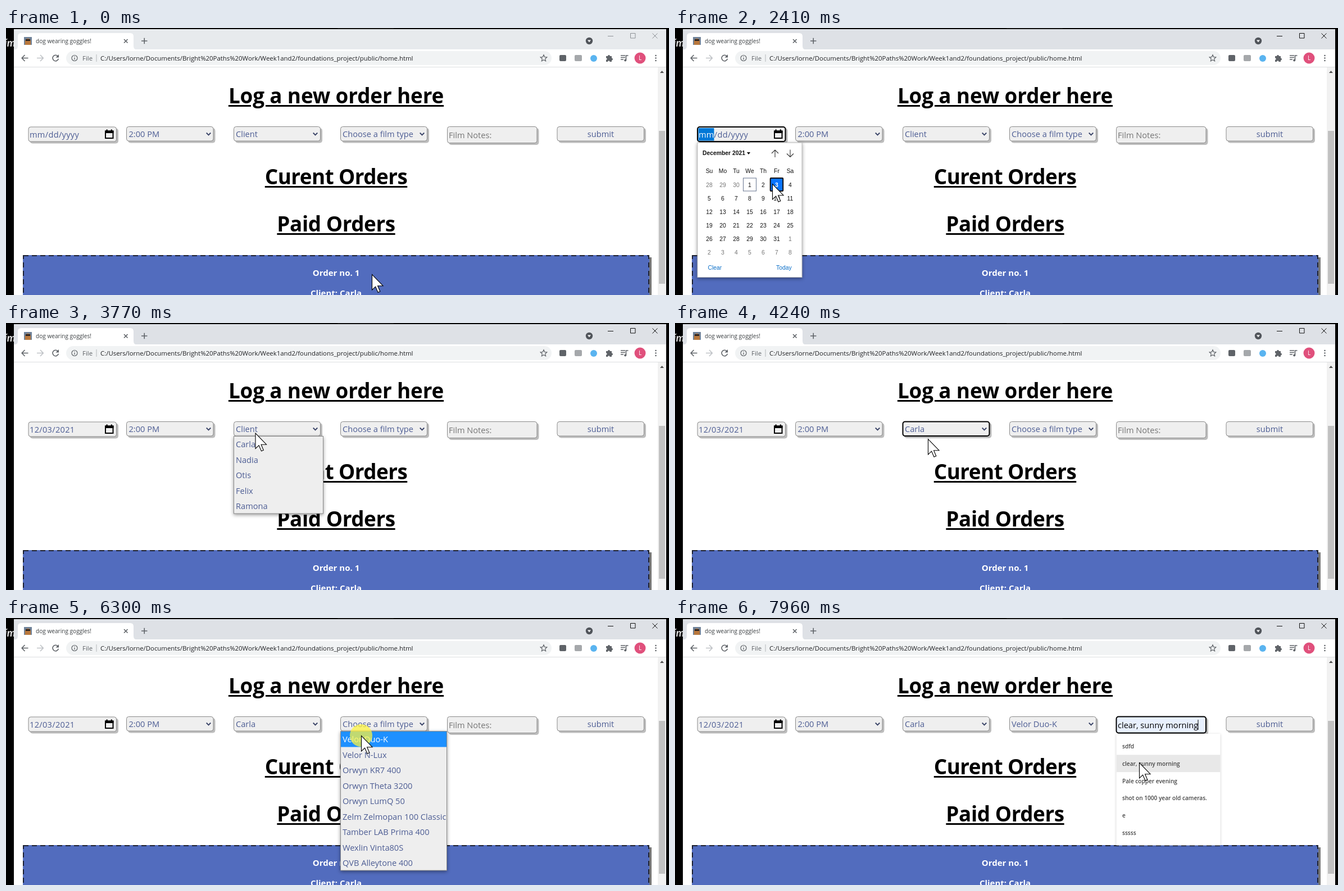
Recreate the animation shown at these times as an HTML page. Size 1180 by 475 pixels, loop 8 s.

```html
<!DOCTYPE html>
<html lang="en">
<head>
<meta charset="utf-8">
<title>Order form</title>
<style>
html, body { margin: 0; width: 1180px; height: 475px; overflow: hidden; background: #000; }
svg { position: absolute; inset: 0; display: block; }
text { font: 14.6px "Open Sans", "Noto Sans", sans-serif; fill: #4d5d94; white-space: pre; }
.mid { text-anchor: middle; }
h1 {
  position: absolute; left: 14px; width: 1147px; margin: 0; text-align: center;
  font: 700 36.8px/50px "Open Sans", "Noto Sans", sans-serif; color: #000;
  text-decoration: underline 3px; text-underline-offset: 3px;
}
.ui { font-size: 11.4px; fill: #202124; }
.line { fill: none; stroke: #5f6368; stroke-width: 1.6; }
.win { fill: none; stroke: #8d9196; stroke-width: 1; }
.active .win { stroke: #111; }
.strip { fill: #e7eaed; }
.active .strip { fill: #dee1e6; }
.field { fill: #efefef; stroke: #8a8a8a; stroke-width: 1; filter: drop-shadow(3px 3px .6px #bdbdbd); }
.field.focus { stroke: #000; stroke-width: 2; }
.field.filled { fill: #e8f0fe; }
.chev { fill: none; stroke: #3a4468; stroke-width: 1.9; }
.order { font-weight: 700; font-size: 15px; fill: #fff; }
.pop { filter: drop-shadow(0 2px 3px #0006); }
.soft { filter: drop-shadow(0 1px 2px #0003); }
.cal text { font: 10.36px "Liberation Sans", Arial, sans-serif; fill: #111; }
.cal .out { fill: #757575; }
.cal .link { fill: #0b6fc8; }
.cal .bold { font-weight: 700; }
.cal .picked { fill: #fff; font-weight: 700; }
.hint { font-weight: 600; font-size: 10.1px; fill: #444; }
</style>
</head>
<body>
<svg id="stage" width="1180" height="475" viewBox="0 0 1180 475">
  <text x="-3" y="33" style="font:italic 700 19px Lato,sans-serif;fill:#ddd">ím</text>
  <path d="M590 .5H690" stroke="#222"/>

  <rect class="strip" x="14" y="2" width="1161" height="37"/>
  <path d="M15 38.5Q21 38.5 21 32V15Q21 9 27 9H221Q227 9 227 15V32Q227 38.5 233 38.5Z" fill="#fff"/>
  <rect x="14" y="38" width="1161" height="437" fill="#fff"/>
  <rect x="32" y="16" width="14" height="14" fill="#6f8299"/>
  <path d="M34 30V22Q39 15 44 22V30Z" fill="#b9783c"/>
  <path d="M35 20H43V23H35Z" fill="#2b2422"/>
  <text class="ui" x="53" y="27" style="font-size:10.1px;fill:#3c4043">dog wearing goggles!</text>
  <path class="line" d="M210 20l6.5 6.5M216.500 20l-6.500 6.500M241 23h10.500M246.250 17.750v10.500"/>
  <circle cx="1038" cy="23" r="6.200" fill="#50545a"/>
  <path d="M1035 21.500h6l-3 3.800z" fill="#fff"/>
  <path class="win" d="M1071 14.500h10M1111.500 9.500h8.500v8.500h-8.500zM1150.500 9.500l9 9M1159.500 9.500l-9 9"/>

  <path class="line" d="M39.500 53.500H28.500M33.500 48l-5.300 5.500 5.300 5.500"/>
  <path class="line" d="M55 53.500h11M61 48l5.300 5.500-5.300 5.500" style="stroke:#bfc2c6"/>
  <path class="line" d="M92.500 50.500a5.200 5.200 0 1 0 .8 4.200"/>
  <path d="M94 47v5.500h-5.500z" fill="#5f6368"/>
  <rect x="107" y="41" width="864" height="25" rx="12.500" fill="#f1f3f4"/>
  <circle class="line" cx="122" cy="53.500" r="5" style="stroke-width:1.200"/>
  <path class="line" d="M122 53v3.200M122 50.500v1.300" style="stroke-width:1.300"/>
  <text class="ui" x="136" y="57.500" style="fill:#5f6368">File</text>
  <path d="M161 47v13" stroke="#b4b7bb"/>
  <text class="ui" x="168" y="57.500">C:/Users/lorne/Documents/Bright%20Paths%20Work/Week1and2/foundations_project/public/home.html</text>
  <path class="line" style="stroke-width:1.200" d="M957 47.800l1.700 3.800 4.100.4-3.100 2.800.9 4.100-3.600-2.100-3.600 2.100.9-4.100-3.100-2.800 4.100-.4z"/>
  <rect x="985" y="48" width="12" height="11" rx="2" fill="#5f6368"/>
  <rect x="1012" y="48" width="13" height="11" rx="2" fill="#a5a8ab"/>
  <circle cx="1046" cy="54" r="6" fill="#5ab4f0"/>
  <path d="M1068 50h3a2 2 0 1 1 4 0h3v3.500a2 2 0 1 1 0 4v2.500h-3.500a1.700 1.700 0 0 0-3.400 0H1068v-3.300a1.700 1.700 0 0 0 0-3.400z" fill="#5f6368"/>
  <path class="line" d="M1094 49h8M1094 52.500h8M1094 56h5M1103.500 57.500V49h4"/>
  <circle cx="1102.200" cy="57.500" r="2" fill="#5f6368"/>
  <circle cx="1128.500" cy="53.500" r="10" fill="#e0507c"/>
  <text class="ui mid" x="1128.500" y="57.200" style="font-size:10px;fill:#fff">L</text>
  <path d="M1156.500 49v.01M1156.500 53.500v.01M1156.500 58v.01" stroke="#5f6368" stroke-width="2.600" stroke-linecap="round"/>
  <path d="M14 69.500H1175" stroke="#dcdee0"/>

  <rect x="1160" y="70" width="15" height="405" fill="#f1f1f1"/>
  <rect x="1162" y="183" width="11" height="272" fill="#c1c1c1"/>
  <path d="M1164 80h7l-3.500-4z" fill="#505050"/>

  <rect x="34" y="408" width="1115" height="70" fill="#777"/>
  <rect x="30" y="404" width="1115" height="90" fill="#526cbe"/>
  <rect x="31" y="405" width="1113" height="90" fill="none" stroke="#1c2030" stroke-width="2" stroke-dasharray="9 6"/>
  <text class="order mid" x="587.500" y="441">Order no. 1</text>
  <text class="order mid" x="587.500" y="477">Client: Carla</text>

  <rect class="field" id="dateBox" x="40" y="176" width="156.500" height="26" rx="4"/>
  <rect class="field" x="214.500" y="175.500" width="154.500" height="25.500" rx="4"/>
  <rect class="field" id="clientBox" x="405.500" y="175.500" width="154" height="25.500" rx="4"/>
  <rect class="field" id="filmBox" x="595.500" y="175.500" width="154" height="25.500" rx="4"/>
  <rect class="field" id="noteBox" x="785.500" y="175.500" width="159.500" height="29" rx="4"/>
  <rect class="field" x="981" y="175.500" width="154.500" height="25.500" rx="4"/>
  <path class="chev" d="M356.700 186.500l3.800 3.800 3.800-3.800M546.700 186.500l3.800 3.800 3.800-3.800M736.700 186.500l3.800 3.800 3.800-3.800"/>
  <path d="M177 183.500h13.500v12.500h-13.500z" fill="none" stroke="#000" stroke-width="2"/>
  <path d="M176 182.500h15.500v4.500h-15.500zM178.500 180.500h2.200v3h-2.200zM186.700 180.500h2.200v3h-2.200z"/>
  <rect id="dateSel" x="41.500" y="178" height="22.500" fill="#0078d7"/>
  <text x="42" y="195" letter-spacing=".3"><tspan id="month"></tspan><tspan id="rest"></tspan></text>
  <text x="218.500" y="194">2:00 PM</text>
  <text id="client" x="409" y="194"></text>
  <text id="film" x="599" y="194"></text>
  <text id="note" x="788" y="195.500"></text>
  <path id="caret" d="M931 181v18" stroke="#000"/>
  <text class="mid" x="1058.500" y="194">submit</text>
</svg>
<h1 style="top:94.500px;letter-spacing:-.12px">Log a new order here</h1>
<h1 style="top:238.500px;letter-spacing:-.53px">Curent Orders</h1>
<h1 style="top:322.500px;letter-spacing:-.4px">Paid Orders</h1>

<svg width="1180" height="475" viewBox="0 0 1180 475">
  <g class="cal" id="cal">
    <rect class="pop" x="40" y="204" width="186" height="239.500" fill="#fff" stroke="#bbb"/>
    <text class="bold" x="49" y="226">December 2021</text>
    <path d="M128 221h6l-3 4z"/>
    <path d="M178 230v-13M172 223l6-6 6 6M205 216.500v13M199 223.500l6 6 6-6" fill="none" stroke="#333" stroke-width="1.100"/>
    <rect x="121.500" y="267" width="23" height="23" fill="none" stroke="#66748f"/>
    <rect id="pick" y="267" width="22.500" height="23" rx="1" fill="#0a74ff" stroke="#111" stroke-width="2"/>
    <g id="days"></g>
    <text class="link" x="58.500" y="429.500">Clear</text>
    <text class="link" x="180" y="429.500">Today</text>
  </g>
  <g id="clients"></g>
  <g id="films"></g>
  <g id="hints"></g>
  <circle id="click" r="20" fill="#fff53c" fill-opacity=".72"/>
  <path id="cursor" d="M.5.500V28L6.600 22.200 11 32.300 14.800 30.700 10.600 20.700H20Z" fill="#fff" stroke="#000" stroke-width="1.100"/>
</svg>

<script>
const $ = id => document.getElementById(id);
const LOOP = 8000;

const clientNames = ['Carla', 'Nadia', 'Otis', 'Felix', 'Ramona'];
const filmNames = ['Velor Duo-K', 'Velor N-Lux', 'Orwyn KR7 400', 'Orwyn Theta 3200', 'Orwyn LumQ 50',
  'Zelm Zelmopan 100 Classic', 'Tamber LAB Prima 400', 'Wexlin Vinta80S', 'QVB Alleytone 400'];
const noteHints = ['sdfd', 'clear, sunny morning', 'Pale copper evening',
  'shot on 1000 year old cameras.', 'e', 'sssss'];

// [first step, last step, steps, x, y]: the pointer moves in even jumps
const START = [651, 438];
const moves = [
  [70, 700, 10, 201, 177], [890, 1090, 3, 187, 190], [1560, 2010, 8, 173, 277],
  [2560, 3240, 11, 428, 187], [3320, 3320, 1, 437, 185], [3600, 4010, 6, 450, 206],
  [4307, 4640, 6, 619, 187], [5650, 5830, 3, 619, 193], [6020, 6090, 2, 632, 209],
  [6566, 6946, 6, 838, 188], [7240, 7630, 7, 826, 257]
];
const clicks = [[1190, 1560], [2280, 2410], [3370, 3520], [4100, 4240],
  [5440, 5580], [6300, 6490], [7024, 7240], [7830, 7960]];

const text = (x, y, s, cls = '') => `<text x="${x}" y="${y}" class="${cls}">${s}</text>`;

function buildDays() {
  let out = ['Su', 'Mo', 'Tu', 'We', 'Th', 'Fr', 'Sa']
    .map((d, i) => text(61 + 24 * i, 257.6, d, 'mid')).join('');
  for (let i = 0; i < 42; i++) {
    const n = i - 2;
    const day = n < 1 ? n + 30 : n > 31 ? n - 31 : n;
    const cls = n < 1 || n > 31 ? 'mid out' : 'mid d' + n;
    out += text(61 + 24 * (i % 7), 282.6 + 24 * Math.floor(i / 7), day, cls);
  }
  $('days').innerHTML = out;
}

function buildList(id, x, w, names) {
  const h = names.length * 27.5 + 1;
  $(id).innerHTML =
    `<rect class="pop" x="${x + .5}" y="201.5" width="${w - 1}" height="${h - 1}" fill="#eee" stroke="#8a8a8a"/>` +
    `<rect class="hover" x="${x + 1}" y="202" width="${w - 2}" height="27.5" fill="#1e90ff"/>` +
    names.map((s, i) => text(x + 4, 221 + 27.5 * i, s)).join('');
}

function buildHints() {
  $('hints').innerHTML =
    '<rect class="soft" x="785.5" y="206" width="185" height="198.5" fill="#fff"/>' +
    '<rect class="hover" x="786" width="184.5" height="30.8" fill="#e8e8e8"/>' +
    noteHints.map((s, i) => text(796, 232 + 30.8 * i, s, 'hint')).join('');
}

const show = (el, on) => { el.style.display = on ? '' : 'none'; };
const fill = (el, color) => { el.style.fill = color; };

function pointer(t) {
  let [x, y] = START;
  for (const [a, b, n, tx, ty] of moves) {
    if (t < a) break;
    const step = n > 1 ? Math.floor((t - a) / (b - a) * (n - 1) + 1e-6) : 0;
    const p = Math.min(1, (step + 1) / n);
    const e = n > 3 ? p * p * (3 - 2 * p) : p;
    x += (tx - x) * e;
    y += (ty - y) * e;
  }
  return [x, y];
}

function drawList(id, open, y) {
  const hover = y > 201;
  show($(id), open);
  show($(id).querySelector('.hover'), hover);
  fill($(id).querySelector('text'), hover ? '#fff' : '');
}

function draw(t) {
  const within = (a, b) => t >= a && t < b;
  const [x, y] = pointer(t);
  const place = `translate(${x.toFixed(2)} ${y.toFixed(2)})`;
  $('cursor').setAttribute('transform', place);
  $('click').setAttribute('transform', place);
  show($('click'), clicks.some(c => within(...c)));
  $('stage').classList.toggle('active', t >= 1190);

  const focus = { dateBox: [1190, 3370], clientBox: [4240, 5440], filmBox: [6490, 7024], noteBox: [7024, LOOP] };
  for (const id in focus) $(id).classList.toggle('focus', within(...focus[id]));

  const dated = t >= 2560, dateOn = within(...focus.dateBox);
  $('month').textContent = dated ? '12' : 'mm';
  $('rest').textContent = dated ? '/03/2021' : '/dd/yyyy';
  fill($('month'), dateOn ? '#fff' : '');
  show($('dateSel'), dateOn);
  $('dateSel').setAttribute('width', dated ? 17.5 : 28);

  show($('cal'), within(1410, 2560));
  const third = t >= 2280;
  $('pick').setAttribute('x', third ? 169.7 : 121.7);
  $('days').querySelector('.d1').classList.toggle('picked', !third);
  $('days').querySelector('.d3').classList.toggle('picked', third);

  $('client').textContent = t < 4240 ? 'Client' : clientNames[0];
  $('film').textContent = t < 6490 ? 'Choose a film type' : filmNames[0];
  drawList('clients', within(3520, 4240), y);
  drawList('films', within(5580, 6490), y);

  const hints = t >= 7100, row = hints ? Math.floor((y - 212.6) / 30.8) : -1;
  const bar = $('hints').querySelector('.hover');
  show($('hints'), hints);
  show(bar, row >= 0);
  bar.setAttribute('y', 212.6 + 30.8 * Math.max(row, 0));
  $('note').textContent = row < 0 ? 'Film Notes:' : noteHints[row];
  fill($('note'), row < 0 ? '#757575' : t < 7960 ? '#444' : '#000');
  $('noteBox').classList.toggle('filled', row >= 0);
  show($('caret'), t >= 7960);
}

buildDays();
buildList('clients', 405, 160, clientNames);
buildList('films', 595, 190, filmNames);
buildHints();

const began = performance.now();
function tick() {
  draw((performance.now() - began) % LOOP);
  requestAnimationFrame(tick);
}
tick();
</script>
</body>
</html>
```
